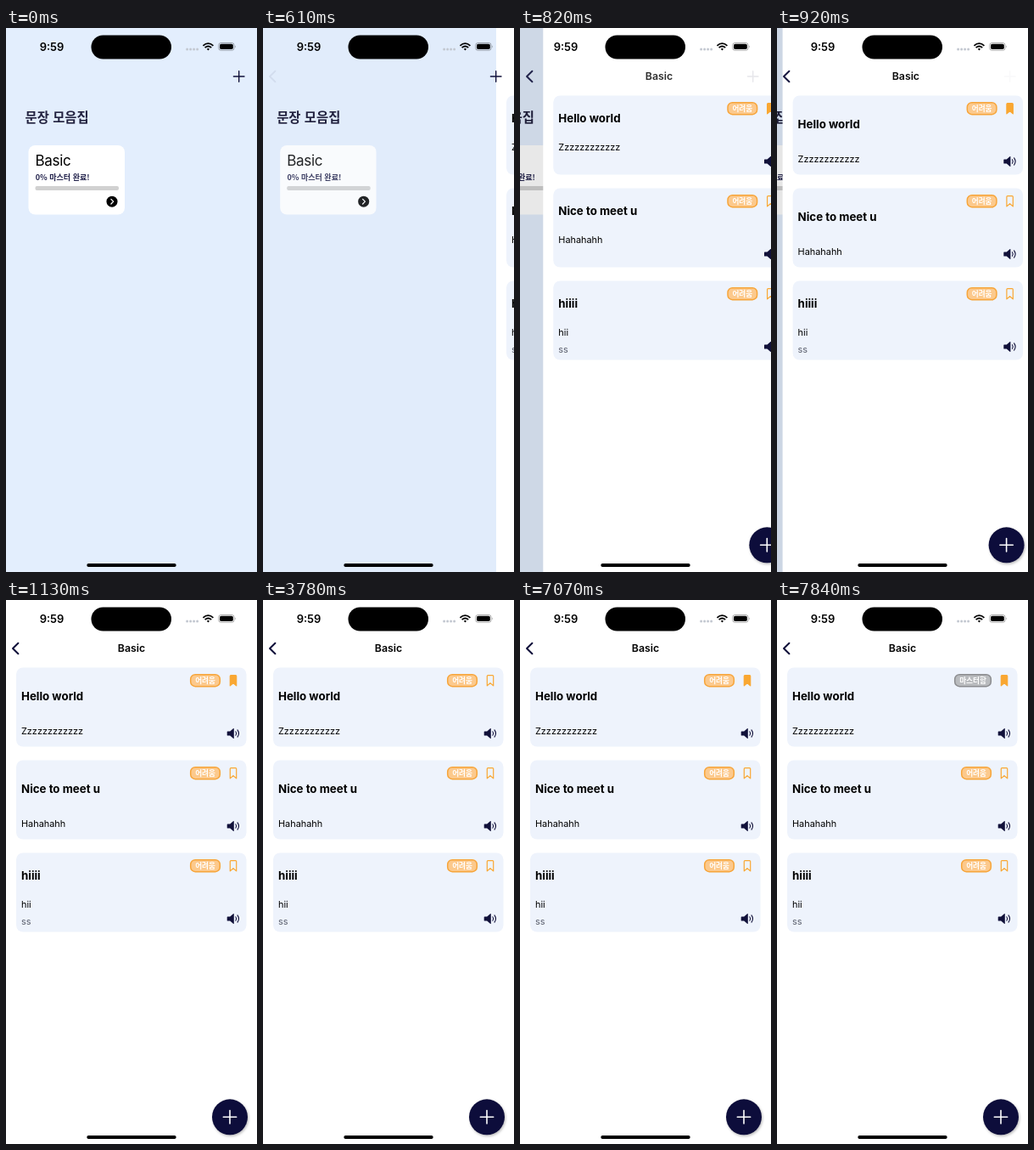
These frames come from a looping animation (296 by 640 pixels, 8 s). An HTML page:

```html
<!DOCTYPE html>
<html lang="ko">
<head>
<meta charset="utf-8">
<title>문장 모음집</title>
<style>
  /* --x: left edge of the incoming page; --lift: 1 until its text settles */
  @property --x { syntax: "<number>"; inherits: true; initial-value: 296; }
  @property --lift { syntax: "<number>"; inherits: true; initial-value: 1; }

  html, body { margin: 0; width: 100%; height: 100%; overflow: hidden; background: #fff; }

  svg {
    --ink: #11113a;
    --orange: #f9a732;
    --done: calc(1 - var(--x) / 296);
    display: block;
    font-family: Inter, "Noto Sans CJK KR", "Noto Sans CJK", sans-serif;
    animation: push 8s step-end infinite;
  }

  .ko { font-family: "Noto Sans CJK KR", "Noto Sans CJK", sans-serif; font-weight: 700; }
  .line { fill: none; stroke: var(--ink); stroke-linecap: round; stroke-linejoin: round; }
  .head { font-size: 13.3px; font-weight: 700; }
  .body { font-size: 10.9px; }
  .label { font-size: 8.6px; fill: #fff; text-anchor: middle; }

  .list { transform: translateX(calc((var(--x) - 296) * .3px)); }
  .dim { opacity: calc(var(--done) * .1); }
  .page { transform: translateX(calc(var(--x) * 1px)); }
  .lifted .head { transform: translateY(calc(var(--lift) * -7px)); }
  .lifted .body { transform: translateY(calc(var(--lift) * -14px)); }

  .add { opacity: calc(1.15 - 1.15 * var(--done)); }
  .back { opacity: var(--done); }
  .name {
    opacity: calc(var(--done) * var(--done));
    transform: translateX(calc(var(--x) * .587px));
  }

  .deck { animation: press 8s step-end infinite; }
  .saved { animation: toggle 8s step-end infinite; }
  .hard { animation: hide 8s step-end infinite; }
  .mastered { animation: show 8s step-end infinite; }

  @keyframes push {
    0% { --x: 296; --lift: 1; }
    7.625% { --x: 275; }
    8.875% { --x: 109.5; }
    10.25% { --x: 27.3; --lift: 1; }
    11.5% { --x: 6.6; --lift: 0; }
    12.875% { --x: 1.3; }
    14.125%, 100% { --x: 0; --lift: 0; }
  }
  @keyframes press {
    0% { opacity: 1; }
    6.25% { opacity: .7; }
    7.625% { opacity: .85; }
    8.875%, 100% { opacity: 1; }
  }
  @keyframes toggle {
    0% { fill: var(--orange); }
    47.25% { fill: transparent; }
    71.25%, 100% { fill: var(--orange); }
  }
  @keyframes hide { 0% { opacity: 1; } 98%, 100% { opacity: 0; } }
  @keyframes show { 0% { opacity: 0; } 98%, 100% { opacity: 1; } }
</style>
</head>
<body>
<svg width="296" height="640" viewBox="0 0 296 640">
  <defs>
    <filter id="soft" x="-30%" y="-30%" width="160%" height="160%">
      <feDropShadow dx="1" dy="1.5" stdDeviation="1.5" flood-color="#000" flood-opacity=".28"/>
    </filter>
    <rect id="card" x="12" y="79.5" width="271.5" height="93" rx="8" fill="#eef3fc"/>
    <g id="hard">
      <rect x="217.7" y="87.7" width="34.6" height="14" rx="5.5" fill="#fcc98c" stroke="#f7a53a" stroke-width="1.5"/>
      <text class="ko label" x="235" y="97.8">어려움</text>
    </g>
    <path id="mark" d="M264.3 89.6q0-1 1-1h5.4q1 0 1 1v11.3l-3.7-3.2-3.7 3.2z"
      stroke="#f9a732" stroke-width="1.2" stroke-linejoin="round"/>
    <g id="sound">
      <path d="M261.4 154.4h2.8l4-3.3q.6-.4.6.4v11q0 .8-.6.4l-4-3.3h-2.8q-.7 0-.7-.7v-3.8q0-.7.7-.7z" fill="#11113a"/>
      <path class="line" d="M270.9 154.8q1.5 2.2 0 4.4M273 152.9q3 4.1 0 8.2" stroke-width="1.1"/>
    </g>
  </defs>

  <g class="list">
    <rect width="296" height="640" fill="#e3eefd"/>
    <text class="ko" x="22.5" y="111.2" font-size="15.4" fill="#22223f">문장 모음집</text>
    <g class="deck">
      <rect x="26.5" y="138" width="113.5" height="81.5" rx="8" fill="#fff"/>
      <text x="34.5" y="161.8" font-size="17" letter-spacing="-.3">Basic</text>
      <text class="ko" x="34.8" y="179.3" font-size="9" fill="#20204a">0% 마스터 완료!</text>
      <rect x="34.5" y="186" width="98.5" height="5" rx="2" fill="#d1d1d1"/>
      <circle cx="125" cy="204.2" r="6.5"/>
      <path d="M123.9 201.4l2.8 2.8-2.8 2.8" fill="none" stroke="#fff" stroke-width="1.2" stroke-linecap="round" stroke-linejoin="round"/>
    </g>
  </g>
  <rect class="dim" width="296" height="640"/>

  <g class="page">
    <rect width="296" height="640" fill="#fff"/>
    <g class="lifted">
      <use href="#card"/>
      <text class="head" x="18" y="118">Hello world</text>
      <text class="body" x="18" y="158">Zzzzzzzzzzzz</text>
      <use class="hard" href="#hard"/>
      <g class="mastered">
        <rect x="209.7" y="87.7" width="42.6" height="14" rx="5.5" fill="#b9bbbe" stroke="#8b8c8f" stroke-width="1.5"/>
        <text class="ko label" x="231" y="97.8">마스터함</text>
      </g>
      <use class="saved" href="#mark"/>
      <use href="#sound"/>
    </g>
    <g class="lifted" transform="translate(0 109)">
      <use href="#card"/>
      <text class="head" x="18" y="118">Nice to meet u</text>
      <text class="body" x="18" y="158">Hahahahh</text>
      <use href="#hard"/>
      <use href="#mark" fill="none"/>
      <use href="#sound"/>
    </g>
    <g transform="translate(0 218)">
      <use href="#card"/>
      <text class="head" x="18" y="111">hiiii</text>
      <text class="body" x="18" y="144">hii</text>
      <text class="body" x="18" y="163.5" fill="#565a68">ss</text>
      <use href="#hard"/>
      <use href="#mark" fill="none"/>
      <use href="#sound"/>
    </g>
    <circle cx="264" cy="608.3" r="21" fill="#11113a" filter="url(#soft)"/>
    <path d="M256.3 608.3h15.4M264 600.6v15.4" stroke="#fff" stroke-width="1.6" stroke-linecap="round"/>
  </g>

  <path class="line add" d="M268.4 57h12.6M274.7 50.7v12.6" stroke-width="1.4"/>
  <path class="line back" d="M14.4 50.8L8 57l6.4 6.2" stroke-width="2"/>
  <text class="name" x="148" y="61.4" font-size="12.3" font-weight="600" text-anchor="middle">Basic</text>

  <text x="54" y="26.7" font-size="13" font-weight="600" text-anchor="middle">9:59</text>
  <rect x="100.5" y="8.5" width="94.5" height="28" rx="14"/>
  <g fill="#c3c8d1">
    <circle cx="213.6" cy="25" r="1.5"/><circle cx="217.6" cy="25" r="1.5"/>
    <circle cx="221.6" cy="25" r="1.5"/><circle cx="225.6" cy="25" r="1.5"/>
  </g>
  <g fill="none" stroke="#000" stroke-width="1.8">
    <path d="M232.4 20.8q6-5.4 12 0M234.6 23.1q3.8-3.3 7.6 0"/>
    <path d="M238.4 26.4l-1.7-1.8q1.7-1.4 3.4 0z" fill="#000" stroke="none"/>
  </g>
  <rect x="250.7" y="17.5" width="18.4" height="8.8" rx="2.8" fill="none" stroke="#000" stroke-opacity=".4" stroke-width=".8"/>
  <rect x="252" y="18.8" width="15.8" height="6.2" rx="1.7"/>
  <path d="M270.2 20.5q1.4 1.4 0 2.8z" opacity=".45"/>
  <rect x="95.3" y="630" width="105.4" height="4" rx="2"/>
</svg>
</body>
</html>
```
